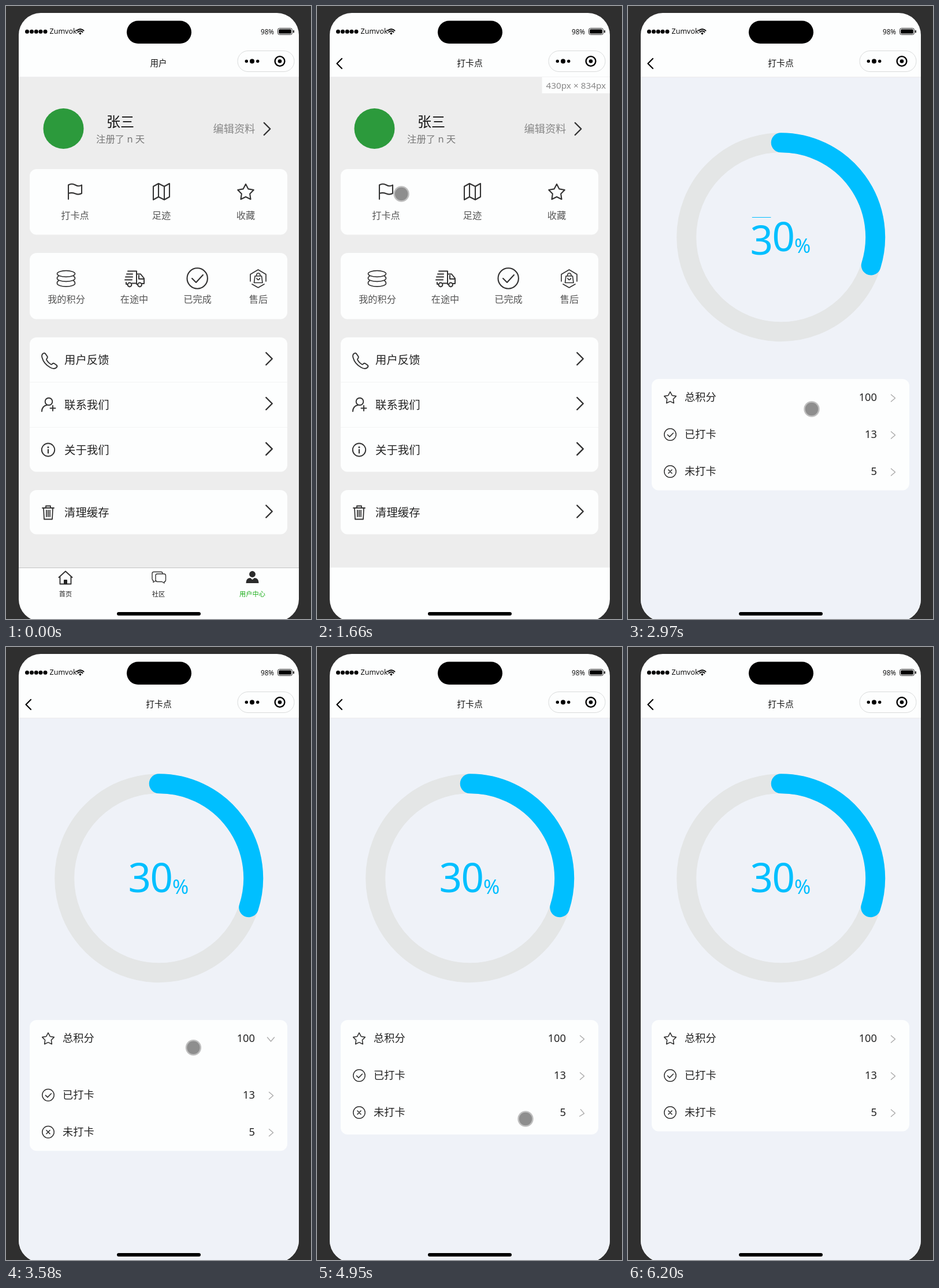
Write an HTML page that moves like this. It is 528 px wide and 1060 px high and loops after 6.51 s.

```html
<!DOCTYPE html>
<html lang="zh">
<head>
<meta charset="utf-8">
<style>
html, body { margin: 0; width: 100%; height: 100%; overflow: hidden; background: #2f2f2f; }
svg { display: block; width: 528px; height: 1060px; font-family: "Noto Sans", "Noto Sans CJK SC", "Noto Sans CJK", sans-serif; }
.line { fill: none; stroke: #333; stroke-width: 2; stroke-linecap: round; stroke-linejoin: round; }
</style>
</head>
<body>
<svg id="stage" viewBox="0 0 528 1060"></svg>
<script>
const LOOP = 6510, WHITE = '#fdfefe', BLUE = '#00bfff';

const text = (x, mid, size, str, fill = '#222', anchor = 'start') =>
  `<text x="${x}" y="${mid + size * 0.37}" font-size="${size}" fill="${fill}" text-anchor="${anchor}">${str}</text>`;
const label = (x, mid, size, str, fill) => text(x, mid, size, str, fill, 'middle');
const line = (d, width = 2, color = '#333') =>
  `<path class="line" d="${d}" style="stroke:${color};stroke-width:${width}"/>`;
const ring = (x, y, r, width = 2) =>
  `<circle class="line" cx="${x}" cy="${y}" r="${r}" style="stroke-width:${width}"/>`;
const dot = (x, y, r, fill = '#000') => `<circle cx="${x}" cy="${y}" r="${r}" fill="${fill}"/>`;
const box = (x, y, w, h, r, fill, more = '') =>
  `<rect x="${x}" y="${y}" width="${w}" height="${h}" rx="${r}" fill="${fill}" ${more}/>`;
const chevron = (x, y, size = 10) => line(`M${x - size / 2} ${y - size}l${size} ${size}-${size} ${size}`, 2.4);
const star = (x, y, r, width) => {
  let d = '';
  for (let i = 0; i < 10; i++) {
    const a = i * Math.PI / 5, k = i % 2 ? r * 0.52 : r;
    d += `${i ? 'L' : 'M'}${x + k * Math.sin(a)} ${y - k * Math.cos(a)}`;
  }
  return line(d + 'z', width);
};

const statusBar = [36.5, 44.5, 52.3, 60, 68].map(x => dot(x, 44.3, 3.5)).join('')
  + text(75.5, 43.5, 12.5, 'Zumvok', '#111')
  + line('M122.5 42.5q6-5 12 0M124.5 45q4-3.4 8 0', 2, '#000') + dot(128.5, 47.6, 1.8)
  + box(209, 25.5, 112, 39.5, 19.7, '#000')
  + text(441, 44.3, 11.7, '98%', '#111')
  + box(470.5, 38.5, 25, 11, 3, 'none', 'stroke="#222"')
  + box(472.2, 40.3, 21.6, 7.4, 1.5, '#000') + box(497, 41.8, 1.8, 4.6, 1, '#000');

const capsule = box(401, 77.5, 98, 36, 18, WHITE, 'stroke="#d9dbdb"')
  + dot(416.3, 95.5, 2.7) + dot(426, 95.5, 4) + dot(435.7, 95.5, 2.7)
  + '<circle cx="474" cy="95.5" r="8.4" fill="none" stroke="#000" stroke-width="2.4"/>' + dot(474, 95.5, 3.3);

const feature = (x, name, y = 362) => label(x, y, 16.2, name, '#555');
const entry = (y, name) => text(101, y, 19.4, name) + chevron(455.5, y - 2, 10.5);

const userPage = box(22, 123, 485, 848, 0, '#ededed')
  + dot(99.5, 212, 35, '#2c9a3c')
  + text(174, 200, 24, '张三', '#111') + text(156, 230, 16.4, '注册了 n 天', '#777')
  + text(358.5, 212.5, 18.2, '编辑资料', '#888') + chevron(452, 212.5, 10.5)
  + [[282, 113.5], [427, 114.5], [573, 232.5], [837, 76.5]].map(([y, h]) => box(41, y, 446, h, 12, WHITE)).join('')
  + box(41, 650, 446, 1, 0, '#f3f4f4') + box(41, 728, 446, 1, 0, '#f3f4f4')
  + line('M108 334V309.5q6-3.5 12 0t11 0V324q-5 3-11 .5t-12-.5', 2.1) + feature(119.5, '打卡点')
  + line('M255 312l9-5 10 5 9-5v23l-9 5-10-5-9 5zM264 307v23M274 312v23', 2.1) + feature(269, '足迹')
  + star(415, 322.5, 14.5, 2.1) + feature(415, '收藏')
  + line('M88.5 463a15.5 5.4 0 0 1 31 0a15.5 5.4 0 0 1-31 0M91 467q-3 2-2.5 4a15.5 5.4 0 0 0 31 0q0-2-2.5-4M91 475q-3 2-2.5 4.5a15.5 5.6 0 0 0 31 0q0-2.5-2.5-4.5', 1.7)
  + feature(104.5, '我的积分', 507.5)
  + line('M211 458.5h15v21h-8M210 481h-2v-3M209 463.5h10M207 468.5h12M206 473.5h12M226 463.5h7l6 7.5v9h-4M228 481h-2M230 466v6h8', 2)
  + ring(214, 482, 3.4) + ring(231.5, 482, 3.4) + feature(222, '在途中', 507.5)
  + ring(331.2, 471, 17.7, 2.1) + line('M322 471l7 7 12-13', 2.1) + feature(331.5, '已完成', 507.5)
  + line('M423 476v-12l13.500-8 13.500 8v12M426 481l10.500 6 10.500-6', 1.7)
  + line('M431 467h11.500l1.500 11.500h-14.500zM433.500 467q0-5 3.300-5t3.300 5M434 471q2.700 5 5.400 0', 1.7) + feature(437, '售后', 507.5)
  + line('M63 602q3-3 5-1l3.500 5q1 2-1 4-1 1 0 2.500 3 5 7 7 1.500 1 2.500-.5 2-2 4-.5l3.500 2.500q2 2 0 4-4 4-11 0-11-6-14-17-1-4 .5-6z', 1.9)
  + entry(612, '用户反馈')
  + ring(74, 684, 6.3, 1.9) + line('M62 701q0-9 9-11M81 691v9M76.500 695.500h9', 1.9) + entry(689.5, '联系我们')
  + ring(73, 767.5, 11.2, 1.9) + line('M73 767v6', 2.2) + dot(73, 763, 1.6, '#333') + entry(767.8, '关于我们')
  + line('M63 868h20M69 868v-3.500h8v3.500M65 868l1 19.500h14l1-19.500M70 872v11M73 872v11M76 872v11', 1.8) + entry(876, '清理缓存');

const tabBar = box(22, 971, 485, 1, 0, '#c4c4c4')
  + line('M91.500 988l11.500-10.500 11.500 10.500M93.500 987v12.500h19V987', 1.9)
  + box(100, 992, 6, 8, 1, '#222') + label(103, 1017.3, 11.2, '首页')
  + line('M260 994h-1l-4 2.500v-3q-2-1-2-3v-9q0-3 3-3h12q3 0 3 2.500M262 982h11.500q3 0 3 3v7.500q0 3-2.500 3v2.500l-4-2.500h-8q-3 0-3-3v-7.500q0-3 3-3z', 1.4)
  + label(264, 1017.3, 11.2, '社区')
  + dot(426.5, 982.5, 5.4, '#2b2b2b') + '<path d="M415.500 998q0-9 7.500-9l3.500 3 3.500-3q7.500 0 7.500 9z" fill="#2b2b2b"/>'
  + label(426.5, 1017.3, 11.2, '用户中心', '#1aad19');

const rows = [
  ['总积分', '100', star(73, 678, 10.8, 1.6)],
  ['已打卡', '13', ring(73, 677, 10.2, 1.5) + line('M68.500 677.500l3.500 3.300 6.300-6.300', 1.7)],
  ['未打卡', '5', ring(73, 677, 10.2, 1.5) + line('M70 674l6 6M76 674l-6 6', 1.7)]
];
const bigDigit = (x, y, n) => `<text x="${x}" y="${y}" font-size="69" fill="${BLUE}" text-anchor="middle">${n}</text>`;

const detailPage = box(22, 123, 485, 940, 0, '#eff2f8')
  + '<circle cx="264.7" cy="399.700" r="163.500" fill="none" stroke="#e4e6e6" stroke-width="34"/>'
  + `<path id="arc" fill="none" stroke="${BLUE}" stroke-width="34" stroke-linecap="round"/>`
  + '<g clip-path="url(#slot)"><g id="strip">' + [0, 1, 2, 3].map(n => bigDigit(231.3, 423.5 + n * 64, n)).join('') + '</g></g>'
  + bigDigit(269.3, 423.5, 0)
  + `<text x="288" y="427" font-size="34" fill="${BLUE}">%</text>`
  + box(41, 645, 446, 193, 12, WHITE, 'id="card"')
  + rows.map(([name, count, icon], i) => `<g id="row${i}">${icon}${text(98, 676.5, 18.2, name)}`
    + `${text(431, 676.3, 18.3, count, '#222', 'end')}<g id="arrow${i}">${line('M455.500 672l7 6-7 6', 1.4, '#aaa')}</g></g>`).join('');

const $ = id => document.getElementById(id);
$('stage').innerHTML = '<defs><clipPath id="body"><rect x="22" y="12" width="485" height="1052" rx="38"/></clipPath>'
  + '<clipPath id="slot"><rect x="205" y="365" width="44" height="66.500"/></clipPath></defs>'
  + '<g clip-path="url(#body)">' + box(22, 12, 485, 1060, 0, WHITE)
  + `<g id="user">${userPage}</g><g id="detail">${detailPage}</g><g id="tabs">${tabBar}</g>`
  + box(22, 122.5, 485, 1, 0, '#e9eaeb') + '</g>'
  + statusBar + capsule
  + `<g id="homeTitle">${label(264, 98.500, 14.5, '用户', '#111')}</g>`
  + `<g id="subTitle">${label(264.500, 98.500, 14.8, '打卡点', '#111')}${line('M43 91l-8.500 8.500 8.500 8.500', 2.2, '#000')}</g>`
  + `<g id="size">${box(389.5, 123, 117.5, 28, 0, WHITE)}${text(396.5, 137.500, 15.3, '430px × 834px', '#888')}</g>`
  + box(192, 1048, 145, 6, 3, '#000')
  + `<g id="touch">${dot(0, 0, 13.7, '#bfbfbf')}${dot(0, 0, 11.2, '#8e8e8e')}</g>`
  + '<path id="pointer" d="M0 0v19l4.500-4 3.300 7.500 3.200-1.500-3.300-7h6.300z" fill="#fff" stroke="#222" stroke-width="1"/>';

const clamp = v => Math.max(0, Math.min(1, v));
const ease = v => v * v * (3 - 2 * v);
const show = (id, on) => $(id).setAttribute('display', on ? 'inline' : 'none');
const move = (id, x, y, more = '') => $(id).setAttribute('transform', `translate(${x} ${y}) ${more}`);

// opening time, closing time, height of each folding panel
const panels = [[3350, 3750, 39], [4110, 4490, 62], [4905, 5400, 87]];
const fold = ([open, close], t, span) => ease(clamp((t - open) / span)) - ease(clamp((t - close) / span));

// time, x, y of the cursor
const path = [
  [80, 136, 0], [190, 168, 93], [330, 205, 290], [450, 222, 500], [600, 180, 410], [719, 150, 362],
  [800, 128, 347], [1080, 128, 346], [1170, 123, 331], [1600, 123, 331], [1660, 146, 325], [1700, 150, 326],
  [2070, 294, 387], [2330, 304, 440], [2700, 316, 660], [2970, 318, 697], [3300, 322, 694], [3760, 326, 692],
  [4080, 366, 748], [4230, 369, 754], [4500, 369, 754], [4850, 361, 814], [4950, 361, 816], [5450, 361, 816],
  [5700, 345, 500], [5930, 306, 107], [5990, 268, 75], [6060, 185, 13], [6110, 125, -17], [6200, 60, -60]
];

function cursor(t) {
  const i = path.findIndex(p => p[0] > t);
  const on = i > 0 && !(t >= 720 && t < 800);
  if (!on) { show('touch', false); show('pointer', false); return; }
  const [t0, x0, y0] = path[i - 1], [t1, x1, y1] = path[i], k = (t - t0) / (t1 - t0);
  const x = x0 + (x1 - x0) * k, y = y0 + (y1 - y0) * k;
  const arrow = y < 123 || (t >= 1700 && t < 2330);
  show('pointer', arrow);
  show('touch', !arrow);
  move(arrow ? 'pointer' : 'touch', x, y);
}

function draw(t) {
  const opened = t >= 1650, detail = t >= 1705;
  show('homeTitle', !opened);
  show('tabs', !opened);
  show('subTitle', opened);
  show('size', opened && t < 2650);
  show('user', !detail);
  show('detail', detail);

  const a = 0.6 * Math.PI * (1 - (1 - clamp((t - 1747) / 1404)) ** 2.5);
  $('arc').setAttribute('d', `M264.7 236.2A163.5 163.5 0 0 1 ${264.71 + 163.5 * Math.sin(a)} ${399.7 - 163.5 * Math.cos(a)}`);
  move('strip', 0, -64 * 3 * clamp((t - 1829) / 1184));

  let shift = 0;
  panels.forEach((p, i) => {
    move('row' + i, 0, i * 64 + shift);
    $('arrow' + i).setAttribute('transform', `rotate(${90 * fold(p, t, 240)} 458.5 678)`);
    shift += p[2] * fold(p, t, 300);
  });
  $('card').setAttribute('height', 192.5 + shift);
  cursor(t);
}

const start = performance.now();
function tick() {
  draw((performance.now() - start) % LOOP);
  requestAnimationFrame(tick);
}
tick();
</script>
</body>
</html>
```
